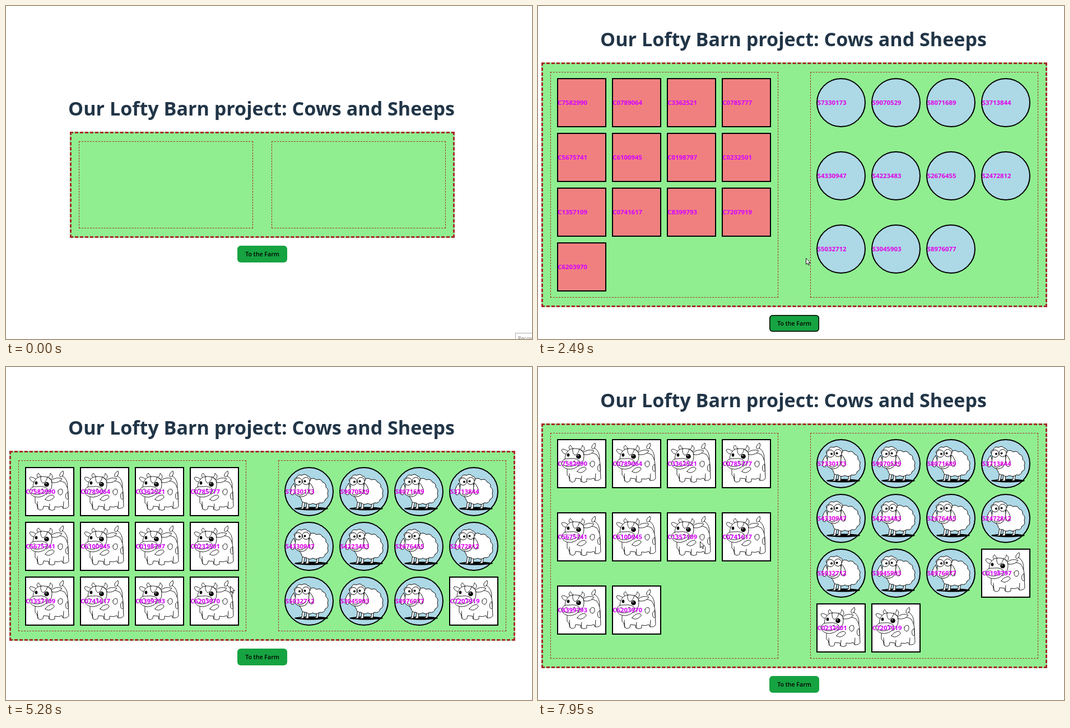
Recreate the animation shown at these times as an HTML page. Size 939 by 596 pixels, loop 8 s.

```html
<!DOCTYPE html>
<html lang="en">
<head>
<meta charset="utf-8">
<title>Farm</title>
<style>
  html, body { margin: 0; width: 100%; height: 100%; overflow: hidden; background: #fff; }
  #stage { position: relative; width: 939px; height: 596px; overflow: hidden; font-family: "Open Sans", "Noto Sans", sans-serif; }
  #stage div, #stage svg { position: absolute; box-sizing: border-box; }
  #title { right: 138px; font: 700 34.1px/40px "Open Sans", "Noto Sans", sans-serif; color: #213547; white-space: nowrap; }
  #field { background: #90ee90; border: 3px dashed #a52a2a; }
  .pen { border: 1px dashed #a52a2a; }
  .card { width: 88px; height: 88px; border: 2px solid #000; }
  .card svg { left: -2px; top: -2px; width: 88px; height: 88px; }
  .card span { position: absolute; left: -.5px; top: 34px; font: 700 11.4px/16px "Open Sans", "Noto Sans", sans-serif; }
  .cow { background: #f08080; color: #d400ff; }
  .cow.drawn { background: #fff; }
  .sheep { background: #add8e6; color: #e000e8; border-radius: 50%; }
  #button { left: 413px; width: 89px; height: 30px; border-radius: 6px; color: #000; text-align: center; font-size: 10.6px; font-weight: 600; line-height: 30px; }
  #button.focus { box-shadow: inset 0 0 0 1.5px #000; }
  #tip { left: 909px; top: 585px; width: 60px; height: 20px; border: 1px solid #aaa; background: #fff; color: #777; font-size: 9px; line-height: 18px; padding-left: 4px; }
  #cursor { left: 0; top: 0; width: 40px; height: 40px; }
</style>
</head>
<body>
<svg width="0" height="0" style="position:absolute">
  <symbol id="cow" viewBox="0 0 88 88">
    <g fill="#fff" stroke="#000" stroke-width=".85" stroke-linejoin="round" stroke-linecap="round">
      <path d="M76 38Q77 22 67 16" fill="none"/>
      <path d="M67 16Q61 21 62 13Q64 9 68 7Q70 12 67 16Z"/>
      <path d="M45 28Q60 21 71 28Q78 38 77 52L78 70Q76 75 68 74L66 70Q60 73 53 71L53 76Q48 79 43 76L42 71L33 70L32 75Q27 79 23 75L21 67L18 64L18 48Z"/>
      <path d="M23 75L22 62M43 76L44 66M68 74L69 62" fill="none"/>
      <path d="M23 19Q19 14 24 11Q26 15 29 17Z"/>
      <path d="M42 18Q46 15 45 11Q52 16 47 22Z"/>
      <path d="M20 22Q9 15 8 20Q11 28 19 27Z"/>
      <path d="M47 24Q55 17 66 21Q61 29 49 28Z"/>
      <path d="M14 38Q14 23 24 18Q40 14 47 24Q51 38 40 48L20 50Z"/>
      <path d="M28 17Q27 26 32 29Q39 26 40 17" fill="none"/>
      <path d="M8 44Q9 34 22 35Q38 33 41 42Q38 52 24 54Q11 54 8 44Z"/>
      <path d="M12 47Q23 53 37 44M15 40L17 39M29 40L32 39" fill="none"/>
      <path d="M59 43Q61 38 66 40Q69 46 64 50Q58 50 59 43Z"/>
      <path d="M36 58Q40 51 49 50Q55 53 49 57Q42 63 36 58Z"/>
      <path d="M76 45Q71 48 73 55Q74 59 77 57Z"/>
    </g>
    <ellipse cx="20" cy="28.500" rx="2.300" ry="3"/>
    <circle cx="38.500" cy="31" r="4.300"/>
    <circle cx="37.500" cy="29.500" r="1" fill="#fff"/>
  </symbol>
  <symbol id="sheep" viewBox="0 0 88 88">
    <ellipse cx="48" cy="74.500" rx="30" ry="3"/>
    <g fill="#fff" stroke="#000" stroke-width=".95" stroke-linejoin="round">
      <path d="M33 59L31 73L26 75L34 75L37 61ZM40 63L39 73L35 75L43 75L44 63ZM58 62L57 72L53 75L60 74L62 61Z"/>
      <path d="M43 24Q51 17 57 23Q65 20 68 27Q75 29 74 36Q80 41 77 47Q80 55 73 58Q71 66 63 64Q57 69 51 65Q44 69 39 64Q31 65 30 57Q24 51 29 45Z"/>
      <path d="M17 29Q8 40 12 49Q18 53 20 39Z"/>
      <path d="M45 28Q55 39 51 48Q45 53 43 38Z"/>
      <path d="M22 26Q17 43 20 49Q30 57 39 50Q46 42 43 26Z"/>
      <path d="M19 27Q15 21 22 19Q24 12 31 15Q37 11 41 16Q48 17 46 25Z"/>
      <path d="M23 48Q31 54 38 44" fill="none"/>
      <circle cx="25" cy="26" r="6.500"/>
      <circle cx="38.500" cy="25" r="6.500"/>
    </g>
    <circle cx="27" cy="26.500" r="2"/>
    <circle cx="36.500" cy="25.500" r="2"/>
  </symbol>
</svg>

<div id="stage">
  <div id="title">Our Lofty Barn project: Cows and Sheeps</div>
  <div id="field"></div>
  <div id="pens"></div>
  <div id="button">To the Farm</div>
  <div id="tip">Recording</div>
  <svg id="cursor" viewBox="-20 -20 40 40">
    <circle id="press" r="9" fill="#f0e400" fill-opacity=".55"/>
    <path d="M.5 .5V11.500L3 9.200L4.800 13L6.600 12.200L4.900 8.500H8.300Z" fill="#fff" stroke="#000" stroke-width=".9"/>
  </svg>
</div>

<script>
const LOOP = 8000;
const $ = id => document.getElementById(id);
const cows = "C7582990 C0789064 C3362521 C0785777 C5675741 C6100945 C0198797 C0232501 C1357109 C0741617 C8399793 C7207919 C6203970".split(" ");
const sheep = "S7330173 S9070529 S8071689 S3713844 S4330947 S4223483 S2676455 S2472812 S5032712 S3045903 S8976077".split(" ");

const small = { x: 114, y: 225, w: 687, h: 190, pen: 311 };
const tall = { x: 6, y: 101, w: 903, h: 438, pen: 407.4 };
const mid = { x: 6, y: 150.4, w: 903, h: 339.6, pen: 407.4 };

// moved: indexes of cows that have crossed to the right pen
const scenes = [
  { at: 0, box: small, empty: true },
  { at: 2490, box: tall, moved: [] },
  { at: 2550, box: tall, moved: [], drawn: true },
  { at: 5280, box: mid, moved: [11], drawn: true },
  { at: 6620, box: tall, moved: [7, 11], drawn: true },
  { at: 7810, box: tall, moved: [6, 7, 11], drawn: true }
];

const path = [
  [400, 928, 588], [750, 747, 515], [1020, 747, 515], [1750, 478, 451],
  [3550, 478, 451], [3680, 460, 446], [4080, 460, 446], [4820, 400, 392],
  [6080, 400, 392], [6350, 385, 348], [7080, 385, 348], [7700, 289, 312]
];
const presses = [[2350, 2490], [5220, 5280], [6550, 6620], [7740, 7810]];

const clamp = v => Math.max(0, Math.min(1, v));
const place = (x, y, w, h) => `left:${x}px;top:${y}px;` + (w ? `width:${w}px;height:${h}px` : "");

function card(id, x, y, drawn) {
  const kind = id[0] === "C" ? "cow" : "sheep";
  const art = drawn ? `<svg><use href="#${kind}"/></svg>` : "";
  return `<div class="card ${kind}${drawn ? " drawn" : ""}" style="${place(x, y)}">${art}<span>${id}</span></div>`;
}

function pen(ids, x, box, drawn) {
  const y = box.y + 17, h = box.h - 34;
  const pitch = Math.floor((h - 11) / Math.ceil(ids.length / 4));
  return `<div class="pen" style="${place(x, y, box.pen, h)}"></div>` +
    ids.map((id, i) => card(id, x + 11.7 + i % 4 * 98, y + 11.2 + Math.floor(i / 4) * pitch, drawn)).join("");
}

function build({ box, moved, drawn, empty }) {
  const left = empty ? [] : cows.filter((_, i) => !moved.includes(i));
  const right = empty ? [] : sheep.concat(moved.map(i => cows[i]));
  $("title").style.top = box.y - 62 + "px";
  $("field").style.cssText = place(box.x, box.y, box.w, box.h);
  $("button").style.top = box.y + box.h + 14 + "px";
  $("pens").innerHTML = pen(left, box.x + 16, box, drawn) +
    pen(right, box.x + box.w - 16 - box.pen, box, drawn);
}

function pointer(t) {
  const i = path.findIndex(p => p[0] > t);
  if (i < 0) return path[path.length - 1].slice(1);
  if (i === 0) return path[0].slice(1);
  const [t0, x0, y0] = path[i - 1], [t1, x1, y1] = path[i];
  const u = (t - t0) / (t1 - t0), k = u * u * (3 - 2 * u);
  return [x0 + (x1 - x0) * k, y0 + (y1 - y0) * k];
}

function buttonColor(t) {
  const k = t < 2490 ? clamp((t - 1560) / 190) : 0;
  const hover = [100, 108, 255];
  return `rgb(${[22, 163, 65].map((c, i) => Math.round(c + (hover[i] - c) * k))})`;
}

let shown;
function draw() {
  const t = performance.now() % LOOP;
  const scene = scenes.filter(s => s.at <= t).pop();
  if (scene !== shown) build(shown = scene);
  const [x, y] = pointer(t);
  $("cursor").style.transform = `translate(${x - 20}px,${y - 20}px)`;
  $("cursor").style.visibility = t < 400 ? "hidden" : "visible";
  $("press").style.display = presses.some(([a, b]) => t >= a && t < b) ? "" : "none";
  $("button").style.background = buttonColor(t);
  $("button").className = t >= 2350 && t < 5220 ? "focus" : "";
  $("tip").style.opacity = 1 - clamp((t - 70) / 130);
  requestAnimationFrame(draw);
}
draw();
</script>
</body>
</html>
```
